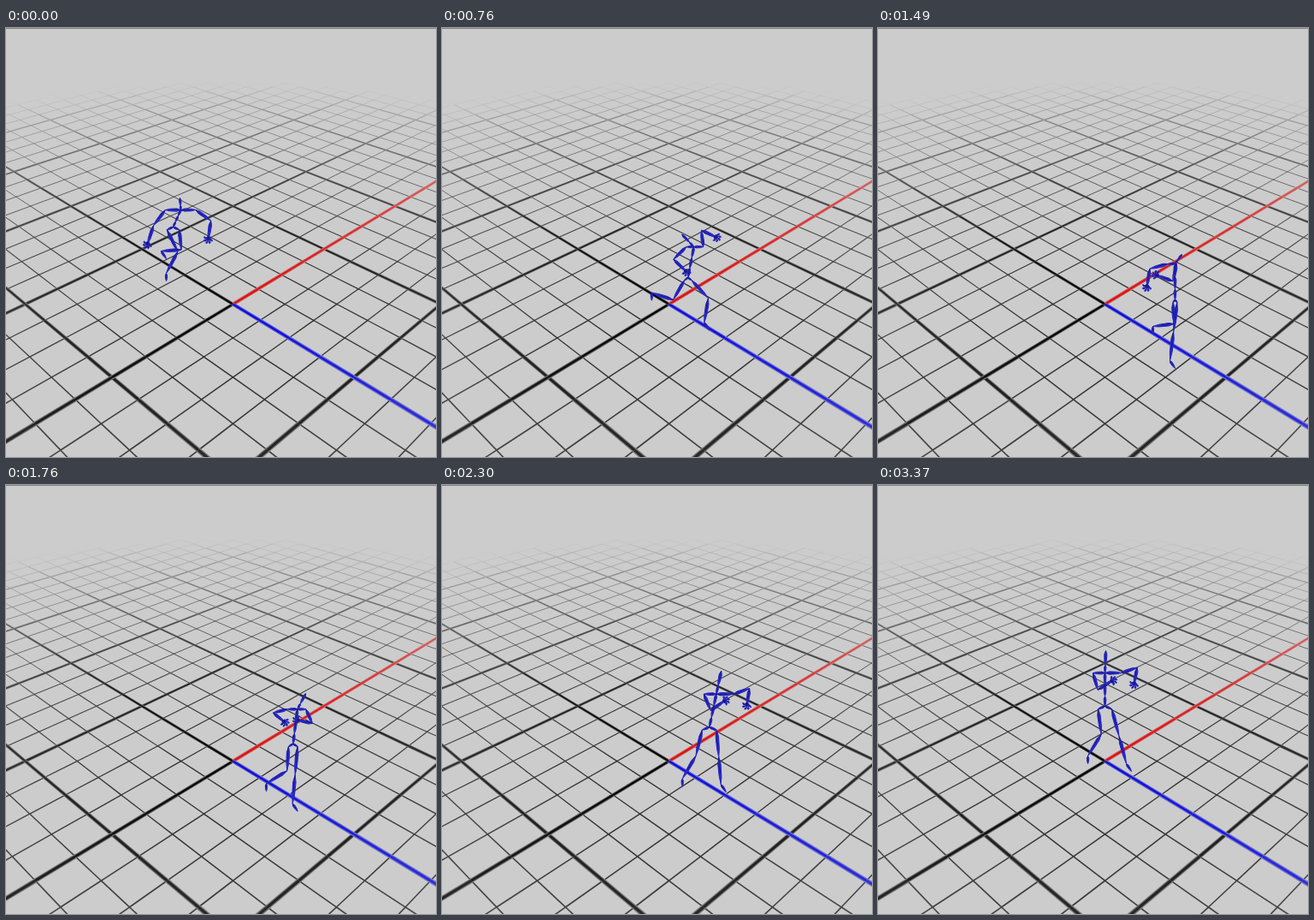
An HTML page with a canvas that plays this animation: 503 by 501 pixels, repeating every 3470 ms.

```html
<!DOCTYPE html>
<html lang="en">
<head>
<meta charset="utf-8">
<title>Motion capture viewer</title>
<style>
  html, body { margin: 0; width: 503px; height: 501px; overflow: hidden; background: #ccc; }
  canvas, svg { position: absolute; left: 0; top: 0; display: block; }
</style>
</head>
<body>
<canvas id="floor" width="503" height="501"></canvas>
<svg width="503" height="501" viewBox="0 0 503 501">
  <path id="body" fill="#2828cc" stroke="#2424c0" stroke-width="1" stroke-linejoin="round"/>
  <path id="edges" fill="none" stroke="#15155c" stroke-width=".6"/>
</svg>
<script>
const BACKGROUND = 204, RADIUS = 5, CELLS = 4;

// Ground plane: u runs along the red axis, v along the blue one.
function project(u, v) {
  const w = 1 + 0.1411 * (u - v);
  return { x: 265.5 + 121.5 * (u + v) / w, y: -197.5 + 520 / w, w };
}

function drawLine(ctx, place, from, rgb, strength, width, power) {
  const step = 1 / CELLS;
  for (let s = from; s < RADIUS; s += step) {
    const fade = strength * (1 - (Math.hypot(...place(s + step / 2)) / RADIUS) ** 1.5);
    const a = project(...place(s)), b = project(...place(s + step * 1.02));
    if (!(fade > 0) || Math.min(a.w, b.w) < 0.6) continue;
    const stroke = (alpha, scale) => {
      const mixed = rgb.map(c => Math.round(BACKGROUND + (c - BACKGROUND) * alpha));
      ctx.strokeStyle = `rgb(${mixed})`;
      ctx.lineWidth = width * scale / ((a.w + b.w) / 2) ** power;
      ctx.beginPath();
      ctx.moveTo(a.x, a.y);
      ctx.lineTo(b.x, b.y);
      ctx.stroke();
    };
    if (width > 2) stroke(fade * 0.5, 1.35);
    stroke(fade, width > 2 ? 0.75 : 1);
  }
}

function drawFloor() {
  const ctx = document.getElementById('floor').getContext('2d');
  ctx.fillStyle = '#ccc';
  ctx.fillRect(0, 0, 503, 501);
  const both = (k, ...style) => {
    drawLine(ctx, s => [s, k], -RADIUS, ...style);
    drawLine(ctx, s => [k, s], -RADIUS, ...style);
  };
  const count = RADIUS * CELLS;
  for (let i = 1 - count; i < count; i++) {
    if (i % CELLS) both(i / CELLS, [35, 35, 35], 0.95, 1.25, 1);
  }
  for (let k = 1 - RADIUS; k < RADIUS; k++) {
    if (k) both(k, [15, 15, 15], 1, 2.8, 1.6);
  }
  both(0, [0, 0, 0], 1, 2.8, 1.5);
  drawLine(ctx, s => [s, 0], 0, [222, 15, 15], 1, 3.1, 1);
  drawLine(ctx, s => [0, s], 0, [12, 12, 222], 1, 3.1, 1);
  ctx.fillStyle = '#808080';
  ctx.fillRect(0, 0, 503, 1);
}

// Joint positions relative to the pelvis; elbows and knees follow by rule.
const land = { breadth: 0.9, head: [8, -34], chest: [9, -20],
  handL: [-30, 20], handR: [41, 14], footL: [-8, 54], footR: [-14, 28] };
const run = { breadth: 0.7, head: [-4, -45], chest: [7, -31],
  handL: [-14, -25], handR: [12, -55], footL: [-49, 26], footR: [21, 46] };
const reach = { breadth: 0.3, head: [-7, -56], chest: [6, -41],
  handL: [6, 22], handR: [57, -23], footL: [-25, 14], footR: [7, 60] };
const turn = { breadth: 0.3, head: [8, -53], chest: [0, -42],
  handL: [-33, -15], handR: [-22, -29], footL: [-26, 31], footR: [-6, 71] };
const guard = { breadth: 1, head: [1, -65], chest: [0, -39],
  handL: [9, -30], handR: [34, -26], footL: [-20, 58], footR: [25, 67] };

const key = (at, x, y, shape, lean = 0) => {
  const pose = { at, pelvis: [x + 0.5, y + 0.5], breadth: [shape.breadth] };
  for (const joint of ['head', 'chest', 'handL', 'handR', 'footL', 'footR']) {
    const [dx, dy] = shape[joint];
    pose[joint] = [pose.pelvis[0] + dx - dy * lean, pose.pelvis[1] + dy];
  }
  return pose;
};
const keys = [
  key(0, 195, 232, land), key(5, 254, 266, run), key(12, 327, 320, reach),
  key(16, 347, 317, turn), key(22, 319, 287, guard, 0.25),
  key(29, 297, 276, guard), key(36, 265, 258, guard)
];

// Smooth path through the keys, with a hop in the first stretch.
function poseAt(picture) {
  const last = keys.length - 1;
  let k = 0;
  while (k < last - 1 && picture >= keys[k + 1].at) k++;
  const a = keys[k], b = keys[k + 1];
  const before = keys[Math.max(k - 1, 0)], after = keys[Math.min(k + 2, last)];
  const span = b.at - a.at, t = (picture - a.at) / span;
  const hop = k ? 0 : 17 * Math.sin(Math.PI * t);
  const pose = {};
  for (const joint of Object.keys(a).filter(name => name !== 'at')) {
    pose[joint] = a[joint].map((p, i) => {
      const q = b[joint][i];
      const m = (q - before[joint][i]) / (b.at - before.at) * span;
      const n = (after[joint][i] - p) / (after.at - a.at) * span;
      const value = p + t * (m + t * (3 * (q - p) - 2 * m - n + t * (2 * (p - q) + m + n)));
      return i ? value - hop : value;
    });
  }
  return pose;
}

const mix = (a, b, t) => [a[0] + (b[0] - a[0]) * t, a[1] + (b[1] - a[1]) * t];
const text = ([x, y]) => x.toFixed(2) + ' ' + y.toFixed(2);

// Middle joint of a limb: the shorter the reach, the further it stands out.
function bend(root, tip, length, amount, side) {
  const dx = tip[0] - root[0], dy = tip[1] - root[1], reach = Math.hypot(dx, dy) || 1;
  const out = Math.min(amount * Math.sqrt(Math.max(0, length ** 2 - reach ** 2)), 17, reach) * side / reach;
  const [x, y] = mix(root, tip, 0.5);
  return [x - dy * out, y + dx * out];
}

function skeleton(pose) {
  let body = '', edges = '';
  const bone = (a, b) => {
    const dx = b[0] - a[0], dy = b[1] - a[1], length = Math.hypot(dx, dy) || 1;
    const half = Math.min(1.7, 0.7 + length * 0.05);
    const side = (t, s) => {
      const [x, y] = mix(a, b, t);
      return text([x - dy / length * half * s, y + dx / length * half * s]);
    };
    body += `M${text(a)}L${side(.25, 1)}L${side(.7, .8)}L${text(b)}L${side(.7, -.8)}L${side(.25, -1)}Z`;
    edges += `M${text(a)}L${side(.25, .4)}L${text(mix(a, b, .6))}`;
  };
  const chain = points => points.slice(1).forEach((p, i) => bone(points[i], p));
  const hand = (elbow, wrist) => {
    const aim = Math.atan2(wrist[1] - elbow[1], wrist[0] - elbow[0]);
    const at = (r, angle) => [wrist[0] + r * Math.cos(angle), wrist[1] + r * Math.sin(angle)];
    for (let i = -2; i <= 2; i++) {
      const spread = aim + i * 0.8;
      chain([at(2.5, aim + Math.PI), at(3, spread), at(5.5, spread + 0.35)]);
    }
  };

  const { head, chest, pelvis } = pose, [breadth] = pose.breadth;
  chain([head, mix(head, chest, .65), chest, mix(chest, pelvis, .35), mix(chest, pelvis, .7), pelvis]);
  for (const [wrist, ankle, side] of [[pose.handL, pose.footL, -1], [pose.handR, pose.footR, 1]]) {
    const shoulder = [chest[0] + side * 15 * breadth + 0.12 * (wrist[0] - chest[0]), chest[1]];
    const elbow = bend(shoulder, wrist, 46, 0.42, -side);
    chain([chest, shoulder, elbow, wrist]);
    hand(elbow, wrist);

    const hip = [pelvis[0] + side * 8 * breadth, pelvis[1] + 3];
    const knee = bend(hip, ankle, 63, 0.35, -1);
    chain([pelvis, hip, knee, ankle, [ankle[0] + 3 + side * 3, ankle[1] + 9]]);
  }
  return [body, edges];
}

const LOOP = 3470, PICTURES = 37;
function render(ms) {
  const picture = Math.floor(ms % LOOP / LOOP * PICTURES + 0.35);
  const [body, edges] = skeleton(poseAt(Math.min(picture, PICTURES - 1)));
  document.getElementById('body').setAttribute('d', body);
  document.getElementById('edges').setAttribute('d', edges);
}

drawFloor();
render(0);
const start = performance.now();
(function tick() {
  render(performance.now() - start);
  requestAnimationFrame(tick);
})();
</script>
</body>
</html>
```
